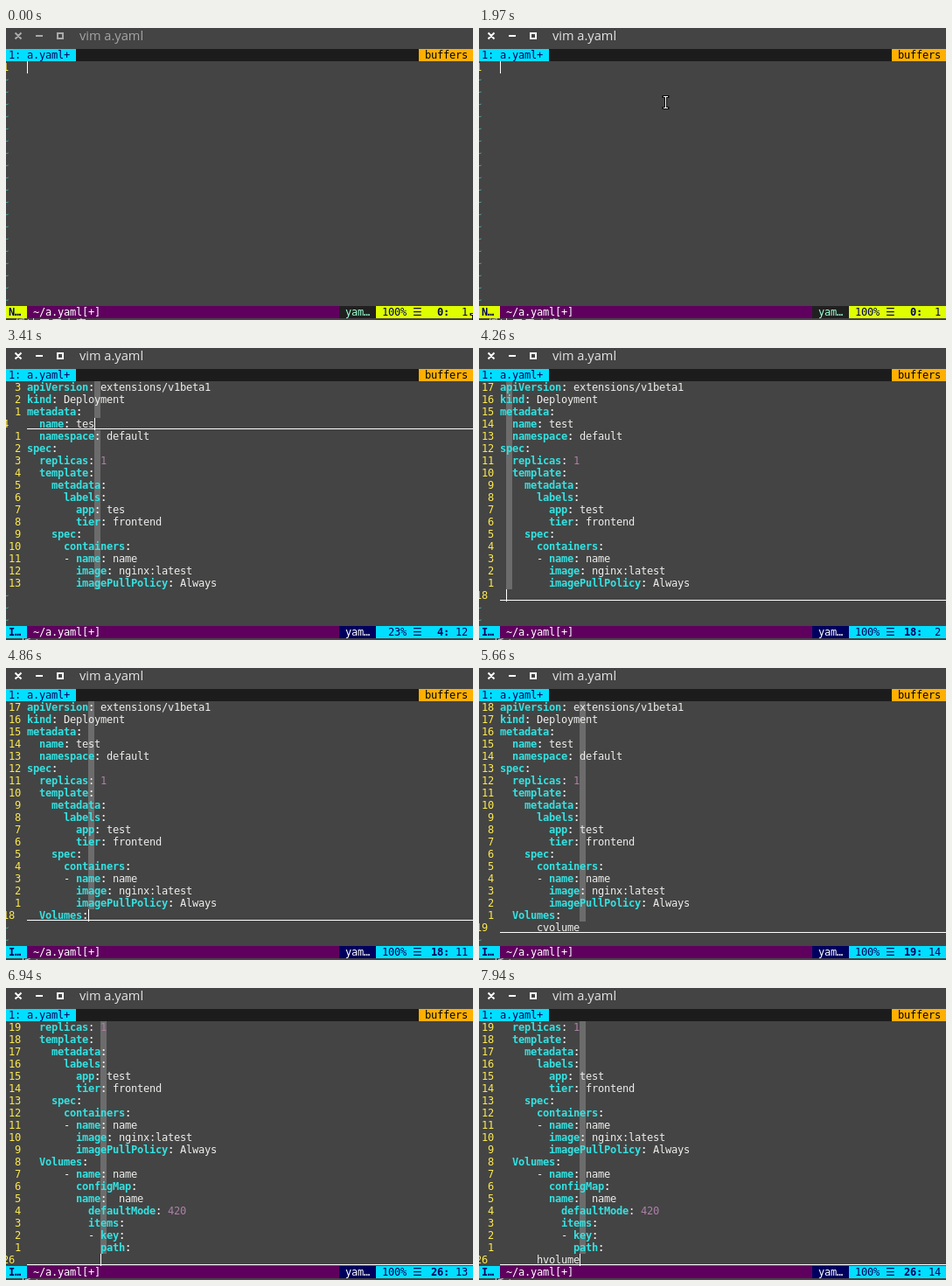
Write an HTML page with a canvas that moves like this. It is 534x334 px and loops after 7.99 s.

```html
<!DOCTYPE html>
<html lang="en">
<head>
<meta charset="utf-8">
<title>vim a.yaml</title>
<style>
html, body { margin: 0; width: 100%; height: 100%; overflow: hidden; background: #444; }
canvas { display: block; }
</style>
</head>
<body>
<canvas id="screen" width="534" height="334"></canvas>
<script>
const ctx = document.getElementById('screen').getContext('2d');
const LOOP = 7990, W = 534, H = 334;
const CELL = 7, LINE = 14, LEFT = -4, TOP = 38, ROWS = 20, GUTTER = 4;
const MONO = '"DejaVu Sans Mono", "DejaVu Sans", "Noto Sans CJK SC", "Noto Sans CJK", monospace';

const MODES = {
  normal: { letter: 'N', fg: '#00005f', bg: '#dfff00', typeFg: '#9cffd3', typeBg: '#202020', message: '--缓冲区无内容--' },
  insert: { letter: 'I', fg: '#00005f', bg: '#00dfff', typeFg: '#fff', typeBg: '#00005f', message: '-- 插入 --' },
  select: { letter: 'S', fg: '#000', bg: '#ffaf00', typeFg: '#fff', typeBg: '#5f0000', message: '-- 选择 --' }
};

const DEPLOYMENT = `apiVersion: extensions/v1beta1
kind: Deployment
metadata:
  name: name
  namespace: default
spec:
  replicas: 1
  template:
    metadata:
      labels:
        app: name
        tier: frontend
    spec:
      containers:
      - name: name
        image: nginx:latest
        imagePullPolicy: Always`.split('\n');

const VOLUME = `      - name: name
        configMap:
        name:  name
          defaultMode: 420
          items:
          - key:
            path:`.split('\n');

// Editor actions; rows and columns count from zero.
function press(ed, key) {
  const line = ed.lines[ed.row];
  ed.mode = 'insert';
  if (key === '\n') {
    ed.lines.splice(++ed.row, 0, line.match(/^ */)[0]);
    ed.col = ed.lines[ed.row].length;
  } else if (key === '<') {
    ed.col -= 2;
    ed.lines[ed.row] = line.slice(0, ed.col);
  } else {
    const start = ed.selected ? ed.col + 1 - ed.selected : ed.col;
    const end = ed.selected ? ed.col + 1 : ed.col;
    ed.lines[ed.row] = line.slice(0, start) + key + line.slice(end);
    ed.col = start + 1;
  }
  ed.selected = 0;
  if (ed.row === 3) ed.lines[10] = '        app: ' + ed.lines[3].slice(8);
}

function jump(ed, row, length) {
  ed.row = row;
  ed.selected = length;
  ed.mode = length ? 'select' : 'insert';
  ed.col = ed.lines[row].length - (length ? 1 : 0);
}

const script = [];
const at = (time, action) => script.push({ time, action });
const type = (time, step, keys) =>
  [...keys].forEach((key, i) => at(time + i * step, ed => press(ed, key)));
const expand = (time, body, length) => at(time, ed => {
  ed.lines.splice(ed.row, 1, ...body);
  jump(ed, body === DEPLOYMENT ? 3 : ed.row, length);
});
const tab = (time, row, length = 0) => at(time, ed => jump(ed, row, length));

at(2230, ed => { ed.mode = 'insert'; });
type(2304, 74, 'deployment');
expand(3060, DEPLOYMENT, 4);
type(3270, 70, 'tes');
type(3440, 0, 't');
tab(3520, 4, 7);
tab(3600, 6, 1);
tab(3680, 11, 8);
tab(3760, 14, 4);
tab(3830, 15, 12);
tab(3920, 16);
type(3970, 50, '\n<<<<');
type(4260, 40, '  ');
type(4350, 53, 'Volumes');
type(4810, 59, ':\n    cvolume');
expand(5760, VOLUME, 4);
tab(6000, 20, 4);
tab(6200, 21, 3);
tab(6390, 23);
tab(6560, 24);
type(6800, 0, '\n');
type(6970, 0, '<');
type(7290, 59, '<<<  hvolume');

function editorAt(time) {
  const ed = { lines: [''], row: 0, col: 0, mode: 'normal', selected: 0 };
  for (const event of script) if (event.time <= time) event.action(ed);
  return ed;
}

function box(x, y, w, h, color) {
  ctx.fillStyle = color;
  ctx.fillRect(x, y, w, h);
}

const columnX = col => LEFT + col * CELL;

// Places text on the terminal grid; CJK characters take two cells.
function put(text, col, y, color, bold = false) {
  ctx.font = `${bold ? 'bold ' : ''}12px ${MONO}`;
  ctx.fillStyle = color;
  for (const char of text) {
    if (char !== ' ') ctx.fillText(char, columnX(col), y + 11);
    col += char >= '\u4e00' ? 2 : 1;
  }
}

function block(text, col, y, color, bg, bold) {
  box(columnX(col), y, text.length * CELL, LINE, bg);
  put(text, col, y, color, bold);
}

function putYaml(line, y) {
  const [, indent, key, rest] = line.match(/^(\s*(?:- )?)(?:(\w+)(?=:))?(.*)$/);
  const start = GUTTER + indent.length, after = start + (key || '').length;
  put(indent, GUTTER, y, '#eeeeec');
  if (key) put(key, start, y, '#34e2e2', true);
  put(rest, after, y, /^: \d+$/.test(rest) ? '#ad7fa8' : '#eeeeec');
  if (key) put(':', after, y, '#eeeeec');
}

function drawTitle(focused) {
  const color = focused ? '#fff' : '#aaa';
  ctx.font = '14.6px "Open Sans", "Noto Sans", sans-serif';
  ctx.fillStyle = focused ? '#e4e4e4' : '#a4a4a4';
  ctx.fillText('vim a.yaml', 84, 14);
  ctx.strokeStyle = color;
  ctx.lineWidth = 2;
  ctx.beginPath();
  ctx.moveTo(10.5, 5.5); ctx.lineTo(17.5, 12.5);
  ctx.moveTo(17.5, 5.5); ctx.lineTo(10.5, 12.5);
  ctx.moveTo(34, 9); ctx.lineTo(42, 9);
  ctx.rect(59, 6, 6, 6);
  ctx.stroke();
}

function drawText(ed, time) {
  const first = Math.max(0, ed.row - ROWS + 1);
  const cursorX = columnX(GUTTER + ed.col);
  const active = ed.mode !== 'normal';
  for (let r = 0; r < ROWS; r++) {
    const n = first + r, y = TOP + r * LINE;
    if (n >= ed.lines.length) {
      put('~', 0, y, '#4f9c9c');
      continue;
    }
    const current = n === ed.row;
    if (active && !current) box(cursorX, y, CELL, LINE, '#6c6c6c');
    if (current && ed.selected)
      box(cursorX - (ed.selected - 1) * CELL, y, ed.selected * CELL, LINE, '#707070');
    if (current && active) box(columnX(GUTTER), y + 12, W, 1, '#fff');
    const label = current ? String(n + 1) : String(Math.abs(n - ed.row)).padStart(3);
    put(label, 0, y, '#fce94f');
    putYaml(ed.lines[n], y);
    const blinkedOff = time >= 5660 && time < 5760;
    if (current && !blinkedOff) box(cursorX, y, 1, LINE, '#fff');
  }
}

function drawBars(ed) {
  const mode = MODES[ed.mode], y = TOP + ROWS * LINE;
  const row = ed.mode === 'normal' ? 0 : ed.row + 1;
  const percent = row ? Math.floor(100 * row / ed.lines.length) : 100;

  box(0, 24, W, LINE, '#1c1c1c');
  block(' 1: a.yaml+ ', 0, 24, '#00005f', '#00dfff');
  block(' buffers ', 68, 24, '#000', '#ffaf00');

  box(0, y, W, LINE, '#5f005f');
  block(` ${mode.letter}… `, 0, y, mode.fg, mode.bg, true);
  put('~/a.yaml[+]', 5, y, '#fff');
  block(' yam… ', 55, y, mode.typeFg, mode.typeBg);
  block(` ${String(percent).padStart(3)}% ☰ `.padEnd(16), 61, y, mode.fg, mode.bg);
  put(String(row).padStart(3) + ':', 69, y, mode.fg, true);
  put(String(ed.col + 1).padStart(3), 73, y, mode.fg);
  put(mode.message, 0, y + LINE, '#eee');
}

// Mouse path: time, x, y
const PATH = [
  [580, 535, 334], [670, 400, 300], [760, 265, 260], [850, 258, 225], [1030, 245, 155],
  [1120, 236, 120], [1310, 206, 33], [1410, 207, 40], [1900, 214, 85], [2230, 214, 85]
];

function drawPointer(time) {
  if (time >= 2230) return;
  const t = Math.max(580, 580 + Math.floor((time - 580) / 80) * 80);
  const i = Math.max(1, PATH.findIndex(p => p[0] >= t));
  const [t0, x0, y0] = PATH[i - 1], [t1, x1, y1] = PATH[i];
  const k = (t - t0) / (t1 - t0);
  const x = Math.round(x0 + (x1 - x0) * k) - .5, y = Math.round(y0 + (y1 - y0) * k);
  for (const [color, width, cap] of [['#111', 3, 'square'], ['#fff', 1, 'butt']]) {
    ctx.strokeStyle = color;
    ctx.lineWidth = width;
    ctx.lineCap = cap;
    ctx.beginPath();
    ctx.moveTo(x, y - 6); ctx.lineTo(x, y + 6);
    for (const end of [-6.5, 6.5]) {
      ctx.moveTo(x - 2.5, y + end); ctx.lineTo(x + 2.5, y + end);
    }
    ctx.stroke();
  }
  ctx.lineCap = 'butt';
}

function draw() {
  const time = performance.now() % LOOP;
  const ed = editorAt(time);
  box(0, 0, W, H, '#444');
  drawTitle(time >= 1570);
  drawText(ed, time);
  drawBars(ed);
  drawPointer(time);
  requestAnimationFrame(draw);
}
draw();
</script>
</body>
</html>
```
